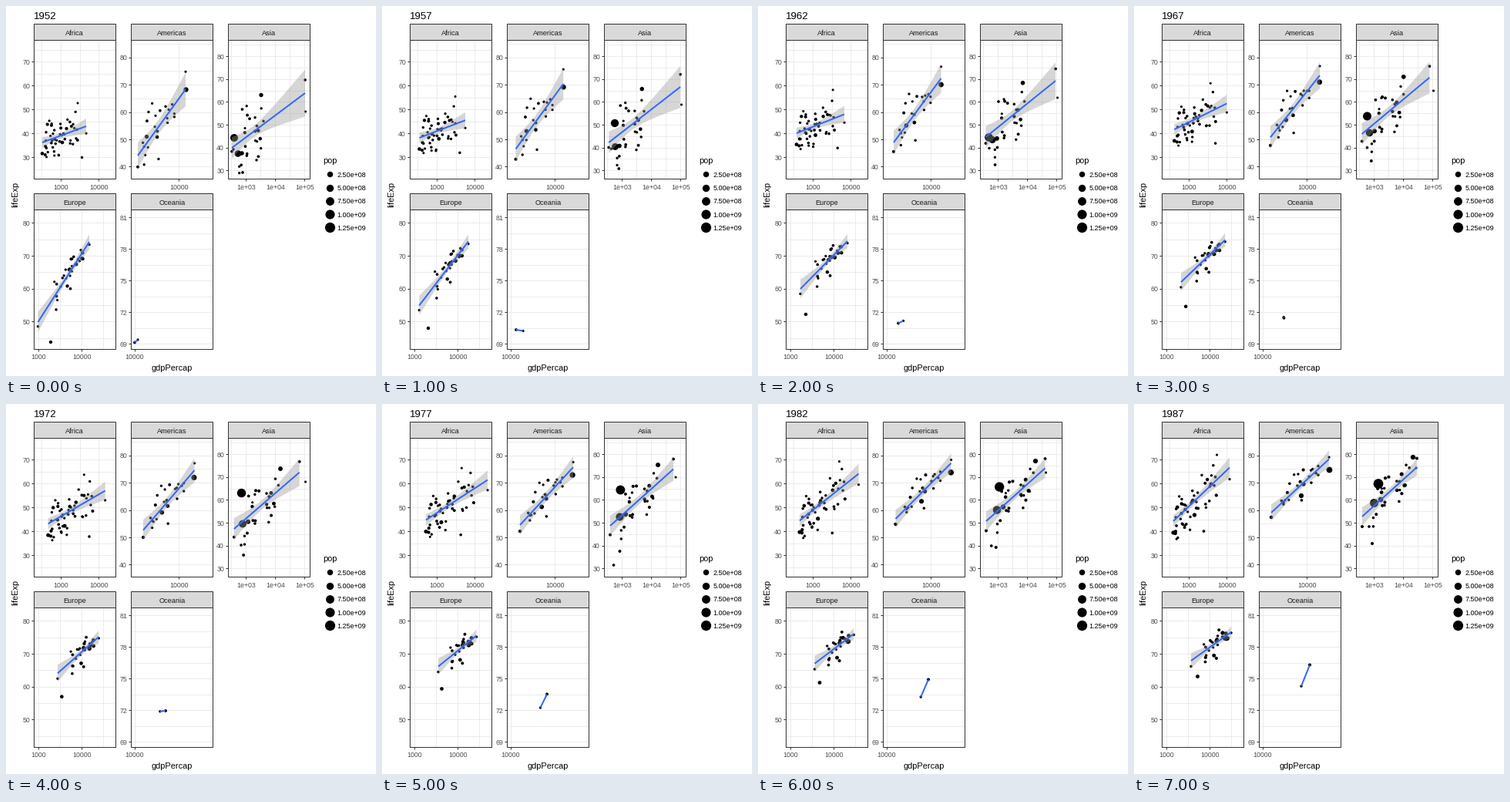
Write a matplotlib script that moves like this. It is 480x480 px and loops after 8 s.

```python
import numpy as np
import matplotlib.pyplot as plt
from matplotlib.animation import FuncAnimation
from matplotlib.patches import Polygon, Rectangle

plt.rcParams["font.family"] = "Liberation Sans"

SIZE, DPI = 480, 72          # one point is one pixel
STEPS = 8                    # one step every five years
PANEL_W, PANEL_H, STRIP_H = 106, 180.4, 21
TOPS = 43.9, 264.3
KEYS = [0, 2, 5, 7]          # steps at which the trend lines are given
GRID, DARK, GREY = "#EBEBEB", "#333333", "#4D4D4D"

fig = plt.figure(figsize=(SIZE / DPI, SIZE / DPI), dpi=DPI, facecolor="white")
ax = fig.add_axes([0, 0, 1, 1])
ax.set(xlim=(0, SIZE), ylim=(SIZE, 0))
ax.axis("off")


def label(x, y, text, size=8.8, color="black", ha="left", **kw):
    return ax.text(x, y, text, fontsize=size, color=color, ha=ha,
                   va="baseline", **kw)


def segment(xs, ys, color, z):
    ax.plot(xs, ys, color=color, lw=1, zorder=z, solid_capstyle="butt")


def dot_area(pop):
    """Squared dot width in pixels for a population in millions."""
    size = 1 + 5 * np.sqrt(np.clip(np.asarray(pop) / 1318.7, 0, 1))
    return (0.75 * (size * 2.845 + 0.945)) ** 2


def mix(pair, u):
    return pair[0] + (pair[1] - pair[0]) * u


class Panel:
    """A facet in pixels: a trend line, a seeded cloud around it, tracked dots.

    xticks and yticks: first position, distance, labels.
    trend: (x0, y0, x1, y1) of the line at each of KEYS.
    spread, skew, reach: (first, last) scatter, leaning and width of the cloud.
    tracks: (population, (step, x, y), ...) for dots that stand out.
    """

    def __init__(self, name, left, row, xticks, yticks, tracks, trend=None,
                 count=0, spread=(0, 0), skew=(1, 1), reach=(1, 1), seed=1):
        self.left, self.top = left, TOPS[row]
        self.right, self.bottom = left + PANEL_W, TOPS[row] + PANEL_H
        self.trend, self.count, self.spread = trend, count, spread
        self.skew, self.reach, self.tracks = skew, reach, tracks
        self.frame(name, xticks, yticks)
        self.make_artists()

        rng = np.random.default_rng(seed)
        n = max(count - len(tracks), 0)
        self.place = np.sort(rng.beta(2, 2, n))
        first = rng.normal(size=n).clip(-1.9, 1.9)
        self.offset = first, 0.8 * first + 0.5 * rng.normal(size=n).clip(-1.5, 1.5)
        small = np.exp(rng.normal(1.7, 1, n)).clip(0.2, 50)
        self.pop = np.append(small, [t[0] for t in tracks])

    def frame(self, name, xticks, yticks):
        left, right, top, bottom = self.left, self.right, self.top, self.bottom
        first, gap, texts = yticks
        for y in first - gap / 2 * np.arange(-1, 2 * len(texts) + 2):
            if top < y < bottom:
                segment([left, right], [y, y], GRID, 1)
        for k, text in enumerate(texts):
            y = first - gap * k
            segment([left - 3, left], [y, y], DARK, 6)
            label(left - 5, y + 3.7, str(text), color=GREY, ha="right")

        first, gap, texts = xticks
        halves = np.arange(-1, 2 * len(texts)) if gap else [0]
        for x in [first + gap / 2 * h for h in halves]:
            if left < x < right:
                segment([x, x], [top, bottom], GRID, 1)
        for k, text in enumerate(texts):
            x = first + gap * k
            segment([x, x], [bottom, bottom + 3], DARK, 6)
            label(x + 0.5, bottom + 13.2, text, color=GREY, ha="center")

        ax.add_patch(Rectangle((left, top - STRIP_H), PANEL_W, STRIP_H,
                               fc="#D9D9D9", ec=DARK, lw=1, zorder=5))
        ax.add_patch(Rectangle((left, top), PANEL_W, PANEL_H,
                               fc="none", ec=DARK, lw=1, zorder=6))
        label((left + right) / 2 + 0.3, top - 6.4, name, 9.3, "#1A1A1A", "center",
              zorder=7)

    def make_artists(self):
        area = Rectangle((self.left, self.top), PANEL_W, PANEL_H,
                         transform=ax.transData)
        self.dots = ax.scatter([], [], c="black", linewidths=0, zorder=2)
        self.band = Polygon(np.zeros((3, 2)), fc="#999999", alpha=0.4, lw=0, zorder=3)
        ax.add_patch(self.band)
        self.line, = ax.plot([], [], color="#3366FF", lw=2, zorder=4,
                             solid_capstyle="butt")
        for artist in (self.dots, self.band, self.line):
            artist.set_clip_path(area)

    def tracked(self, step):
        paths = [np.transpose(t[1:]) for t in self.tracks]
        return np.array([[np.interp(step, p[0], p[1]), np.interp(step, p[0], p[2])]
                         for p in paths])

    def draw(self, step):
        u = step / (STEPS - 1)
        points = self.tracked(step)
        if self.trend is None:
            self.line.set_data(*points.T)
        else:
            x0, y0, x1, y1 = [np.interp(step, KEYS, v) for v in zip(*self.trend)]
            slope = (y1 - y0) / (x1 - x0)
            spread = mix(self.spread, u)
            place = mix(self.reach, u) * self.place ** mix(self.skew, u)
            place[[0, -1]] = 0, 1
            x = mix((x0, x1), place)
            y = y0 + slope * (x - x0) + spread * mix(self.offset, u)
            points = np.vstack([np.column_stack([x, y]), points])
            self.line.set_data([x0, x1], [y0, y1])

            # 95 % confidence band of a straight fit
            gx = np.linspace(x0, x1, 60)
            gy = y0 + slope * (gx - x0)
            far = (gx - x.mean()) ** 2 / (self.count * x.var())
            err = 2.04 * spread * np.sqrt(1 / self.count + far)
            self.band.set_xy(np.column_stack([np.append(gx, gx[::-1]),
                                              np.append(gy - err, (gy + err)[::-1])]))
        self.dots.set_offsets(points)
        self.dots.set_sizes(dot_area(self.pop * 1.1 ** (step - 4)))


panels = [
    Panel("Africa", 36, 0, (71, 49.2, ["1000", "10000"]),
          (196, 31, range(30, 71, 10)),
          trend=[(47, 177, 104, 156), (50, 165, 112, 140.5),
                 (57, 150.5, 137, 98.5), (51, 152, 124, 82.5)],
          count=52, spread=(13, 16), skew=(1.3, 1.6), seed=4,
          tracks=[(54, (0, 73, 177), (7, 78.5, 144)),
                  (35, (0, 78.5, 159), (7, 100, 104)),
                  (0.5, (0, 93, 126), (7, 107.5, 66)),
                  (6, (0, 98.5, 196.5), (4, 108, 172), (7, 90.5, 165))]),
    Panel("Americas", 162, 0, (224, 0, ["10000"]),
          (208.3, 35.4, range(40, 81, 10)),
          trend=[(171, 194, 233, 108), (176, 177, 237.5, 94),
                 (179, 157, 248, 82), (178, 141, 253, 71.5)],
          count=25, spread=(22, 12), skew=(1.3, 1), seed=7,
          tracks=[(210, (0, 233.5, 108.5), (2, 237.5, 102), (7, 253.5, 85.5)),
                  (101, (0, 182.5, 169.5), (7, 217, 119)),
                  (56, (0, 196, 170), (7, 220, 104))]),
    Panel("Asia", 288, 0, (311, 38, ["1e+03", "1e+04", "1e+05"]),
          (213.2, 29.6, range(30, 81, 10)),
          trend=[(293, 184, 388, 113), (295.5, 170, 386, 97),
                 (296, 158, 378, 84.5), (296, 146, 367, 82)],
          count=33, spread=(21, 14), reach=(0.5, 1), seed=3,
          tracks=[(862, (0, 296, 171), (1, 302, 152), (2, 299.5, 170.5),
                   (4, 305.5, 115.5), (7, 317, 103.5)),
                  (567, (0, 301, 191.5), (7, 311.5, 128.5)),
                  (121, (0, 306, 191), (7, 320, 124)),
                  (107, (0, 331, 115.5), (4, 356, 84), (7, 362, 69)),
                  (13, (0, 307, 216), (7, 309, 181)),
                  (7, (0, 295, 186), (4, 305, 183), (5, 300.5, 209), (7, 305, 159)),
                  (0.8, (0, 388.5, 137), (4, 388.5, 101), (7, 366, 83))]),
    Panel("Europe", 36, 1, (41.7, 56.4, ["1000", "10000"]),
          (409.2, 42.6, range(50, 81, 10)),
          trend=[(41.5, 410, 108, 306), (55, 367, 116, 305),
                 (73, 340.5, 122.5, 300.5), (74, 333, 126, 296)],
          count=30, spread=(12, 9), skew=(0.7, 0.7), seed=5,
          tracks=[(37, (0, 58, 436), (2, 62, 400), (5, 77.5, 369.5), (7, 82.5, 353.5)),
                  (56, (0, 98.5, 327.5), (7, 117.5, 303)),
                  (54, (0, 82, 342), (7, 115, 297)),
                  (79, (0, 91, 335), (7, 121, 304))]),
    Panel("Oceania", 162, 1, (166.5, 0, ["10000"]),
          (438, 41, range(69, 82, 3)),
          tracks=[(13, (0, 167, 436.5), (1, 174, 420), (2, 182, 411.5),
                   (4, 207, 398), (5, 214, 376.5), (7, 228, 338.5)),
                  (3, (0, 171, 433), (1, 183, 421.5), (2, 188.5, 408.5),
                   (5, 205.5, 394), (7, 217, 366))]),
]

title = label(36, 17, "", 13.2)
label(215, 473, "gdpPercap", 11, ha="center")
label(15.6, 244.5, "lifeExp", 11, ha="center", rotation=90, rotation_mode="anchor")

label(411, 203.5, "pop", 11)
for n, pop in enumerate(range(250, 1251, 250)):
    y = 218.3 + 17.28 * n
    ax.scatter([420.2], [y], s=dot_area(pop), c="black", linewidths=0)
    label(429.7, y + 3.4, f"{pop * 1e6:.2e}", 9)


def update(step):
    title.set_text(str(1952 + 5 * step))
    for panel in panels:
        panel.draw(step)


anim = FuncAnimation(fig, update, frames=STEPS, interval=1000, repeat=True)
plt.show()
```
